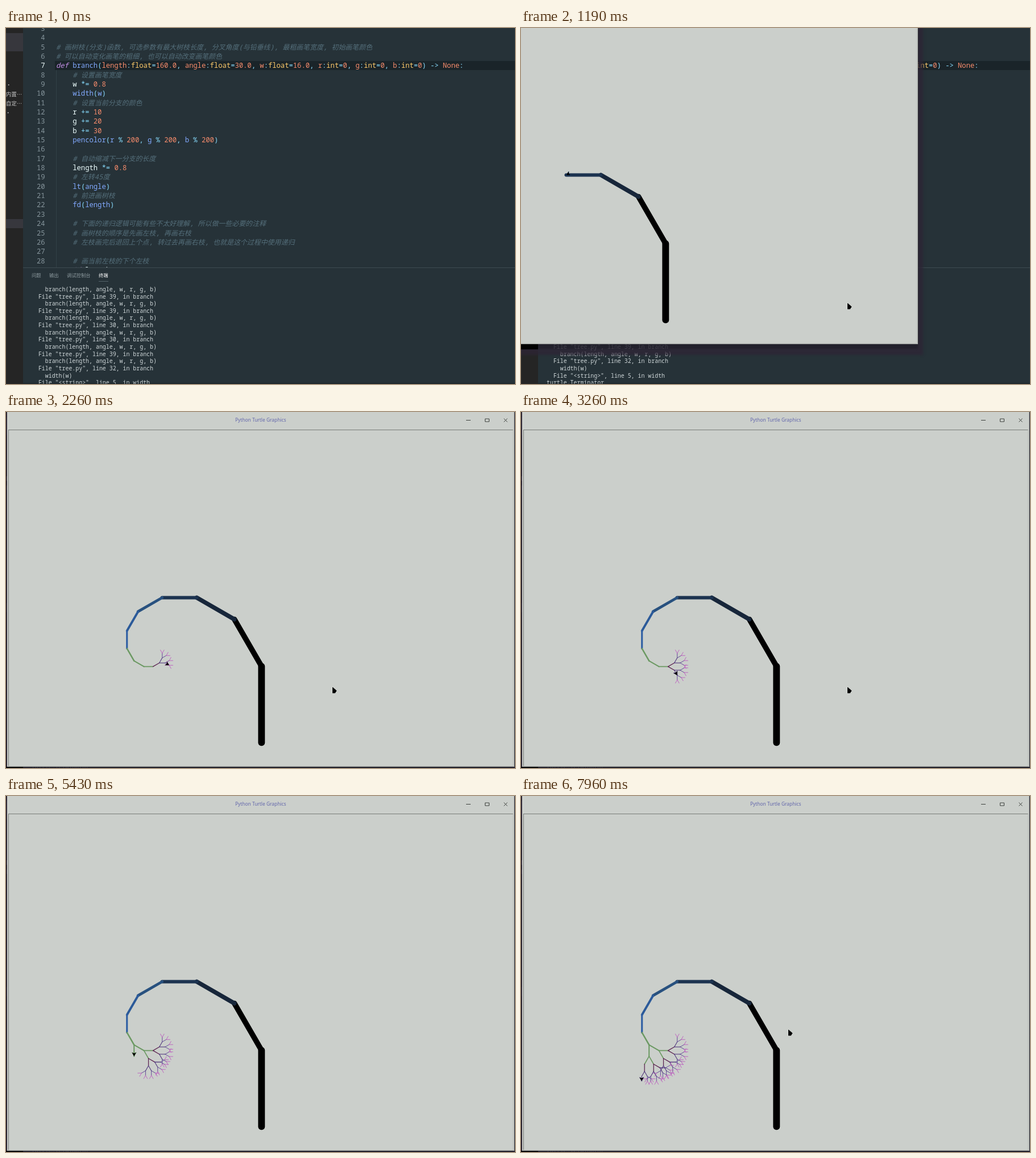
An HTML page with a canvas for the animation above (8 s loop, 895x626 px).

```html
<!DOCTYPE html>
<html lang="zh">
<head>
<meta charset="utf-8">
<title>Recursive tree</title>
<style>
html, body { margin: 0; width: 100%; height: 100%; overflow: hidden; background: #263238; }
#stage { position: absolute; left: 0; top: 0; width: 895px; height: 626px; overflow: hidden; background: #263238; }
#stage div, #stage canvas, #stage svg { position: absolute; }
.row { white-space: pre; }
.code, .num { font: 12.19px/16.35px "Noto Sans Mono", "Noto Sans CJK SC", monospace; }
.num { left: 30px; width: 38.5px; text-align: right; color: #85949b; }
.code { left: 88px; }
.cjk { font-family: "Noto Sans CJK SC", sans-serif; font-size: 11.95px; line-height: 0; }
.note { color: #546e7a; font-style: italic; }
.key { color: #c792ea; font-style: italic; }
.val { color: #f78c6c; }
.type { color: #ffcb6b; }
.fn { color: #82aaff; }
.op { color: #89ddff; }
.name { color: #eeffff; }
#editor { left: 0; top: 0; width: 895px; height: 421px; overflow: hidden; }
#side { left: 0; top: 0; width: 30px; height: 626px; overflow: hidden; background: #252525; color: #c4c4c4; font: 9.4px/16px "Noto Sans CJK SC", sans-serif; }
.sel { left: 0; width: 30px; background: #37373d; }
.tab { top: 427px; font: 8.3px/15px "Noto Sans CJK SC", sans-serif; color: #8d9a9f; }
.term { font: 9.92px/12.65px "Noto Sans Mono", monospace; color: #ced6d8; }
#win { box-sizing: border-box; overflow: hidden; background: #cbcfcb; border: 1px solid #9da19d; border-left-color: #d5d8d5; border-top-color: #d5d8d5; }
#shade { box-shadow: 0 8px 3px rgba(16,22,28,.35), 0 10px 4px 9px rgba(46,36,54,.75); }
#strip { left: 0; width: 30px; height: 9px; background: #000; }
#frame { left: 1px; right: 1px; top: 31px; bottom: 0; border: 1px solid #c0c4c0; border-top-color: #797d79; border-left-color: #797d79; }
#title { left: 0; right: 0; top: 5px; text-align: center; font: 8.4px/18px "Noto Sans", sans-serif; color: #6468ac; }
#btns { right: 9px; top: 9px; }
</style>
</head>
<body>
<div id="stage">
  <div id="editor"></div>
  <div style="left:30px;top:421px;width:865px;height:1px;background:#3d4a50"></div>
  <div id="term"></div>
  <div style="left:30px;top:624px;width:865px;height:2px;background:rgba(0,0,0,.2)"></div>
  <div id="side">
    <div class="sel" style="top:9px;height:32px"></div>
    <div class="sel" style="top:336px;height:16px"></div>
    <div class="row" style="left:0;top:91px">·</div>
    <div class="row" style="left:0;top:108px">内置⋯</div>
    <div class="row" style="left:0;top:124px">自定⋯</div>
    <div class="row" style="left:-1px;top:140px">·</div>
  </div>
  <div id="shade"></div>
  <div id="strip"></div>
  <div id="win">
    <div id="title">Python Turtle Graphics</div>
    <svg id="btns" width="80" height="12" fill="none" stroke="#3c403c">
      <path d="M5 5.5h8M38.5 3h7v5h-7zM71.5 2.5l6 6m0-6l-6 6"/>
    </svg>
    <div id="frame"></div>
    <canvas id="tree" width="895" height="626"></canvas>
  </div>
  <svg id="mouse" width="16" height="18" style="left:0;top:0">
    <path d="M.5 .5L9.2 8L5.8 13H.5Z" fill="#000" stroke="#d4d8d4"/>
  </svg>
</div>
<script>
const LOOP = 8000, PITCH = 16.35;
const $ = id => document.getElementById(id);

function add(parent, cls, text, css) {
  const el = document.createElement('div');
  el.className = cls;
  el.textContent = text;
  Object.assign(el.style, css);
  parent.append(el);
  return el;
}
function span(parent, cls, text) {
  const el = document.createElement('span');
  el.className = cls;
  el.textContent = text;
  parent.append(el);
  return el;
}

// ---- editor ----
const source = [
  '', '',
  '# 画树枝(分支)函数, 可选参数有最大树枝长度, 分叉角度(与铅垂线), 最粗画笔宽度, 初始画笔颜色',
  '# 可以自动变化画笔的粗细, 也可以自动改变画笔颜色',
  'def branch(length:float=160.0, angle:float=30.0, w:float=16.0, r:int=0, g:int=0, b:int=0) -> None:',
  '    # 设置画笔宽度',
  '    w *= 0.8',
  '    width(w)',
  '    # 设置当前分支的颜色',
  '    r += 10',
  '    g += 20',
  '    b += 30',
  '    pencolor(r % 200, g % 200, b % 200)',
  '',
  '    # 自动缩减下一分支的长度',
  '    length *= 0.8',
  '    # 左转45度',
  '    lt(angle)',
  '    # 前进画树枝',
  '    fd(length)',
  '',
  '    # 下面的递归逻辑可能有些不太好理解, 所以做一些必要的注释',
  '    # 画树枝的顺序是先画左枝, 再画右枝',
  '    # 左枝画完后退回上个点, 转过去再画右枝, 也就是这个过程中使用递归',
  '',
  '    # 画当前左枝的下个左枝',
  '    if length >= 10.0:'
];
const TOKEN = /(#.*)|\b(def|if)\b|(\d+(?:\.\d+)?|None)|\b(float|int)\b|([a-z]+(?=\())|([-+*%=<>:(),]+)|([a-z]+)|\s+/g;
const KINDS = ['note', 'key', 'val', 'type', 'fn', 'op', 'name'];

function paintLine(row, text) {
  const nameClass = text.startsWith('def') ? 'val' : text.includes('(') ? 'fn' : 'name';
  for (const m of text.matchAll(TOKEN)) {
    const kind = KINDS[m.slice(1).findIndex(g => g !== undefined)];
    if (kind === 'note') {
      const note = span(row, 'note', '');
      m[0].split(/([\u4e00-\u9fff]+)/).forEach((part, i) => span(note, i % 2 ? 'cjk' : '', part));
    } else span(row, kind === 'name' ? nameClass : kind || '', m[0]);
  }
}
const rowTop = n => 66.4 + (n - 7) * PITCH - PITCH / 2 + 'px';
const editor = $('editor');
add(editor, '', '', { left: '86px', top: '58px', width: '809px', height: '16px', background: '#1a2429' });
add(editor, '', '', { left: '87.5px', top: '74px', width: '1px', height: '347px', background: '#324047' });
source.forEach((text, i) => {
  const n = i + 3;
  add(editor, 'num', n, { top: rowTop(n), color: n === 7 ? '#eeffff' : '' });
  paintLine(add(editor, 'row code', '', { top: rowTop(n) }), text);
});

// ---- terminal ----
[['问题', 45], ['输出', 76], ['调试控制台', 107], ['终端', 163]].forEach(([text, x]) =>
  add($('stage'), 'row tab', text, { left: x + 'px', color: x === 163 ? '#fff' : '' }));
add($('stage'), '', '', { left: '163px', top: '445px', width: '17px', height: '1px', background: '#54636a' });
$('stage').append($('shade'), $('strip'), $('win'), $('mouse'));

const call = '    branch(length, angle, w, r, g, b)';
const log = [call];
for (const n of [39, 39, 30, 30, 39]) log.push(`  File "tree.py", line ${n}, in branch`, call);
log.push('  File "tree.py", line 32, in branch', '    width(w)', '  File "<string>", line 5, in width', 'turtle.Terminator');
const rows = log.map(text => add($('term'), 'row term', text, { left: '45px' }));
function scrollLog(by) {
  rows.forEach((row, i) => {
    row.style.top = 452.9 + (i - by) * 12.64 + 'px';
    row.style.visibility = i < by ? 'hidden' : '';
  });
}

// ---- turtle program, timed in screen updates ----
const SCALE = 0.745, LIMIT = 1200;
const INK = ['#000', '#000', '#17263a', '#1c3350', '#28517f', '#2b5a99', '#2f5fa4', '#6b9962', '#6b9962',
  '#6b9962', '#5b2350', '#4b2f78', '#5a3f90', '#bb5cbf'];
const ops = [];
let clock = 0, x = 449.3, y = 331, dir = 90;

function turn(deg, level) {
  const end = clock + 1 + Math.floor(Math.abs(deg) / 9);
  ops.push({ start: clock, end, x, y, nx: x, ny: y, dir, ndir: dir + deg, level });
  clock = end;
  dir += deg;
}
function move(len, level, pen = len > 0) {
  const end = clock + 1 + Math.floor(Math.abs(len) / 11.98);
  const a = dir * Math.PI / 180;
  const nx = x + len * SCALE * Math.cos(a), ny = y - len * SCALE * Math.sin(a);
  ops.push({ start: clock, end, x, y, nx, ny, dir, ndir: dir, level, pen });
  clock = end;
  x = nx;
  y = ny;
}
function branch(len, level) {
  if (clock > LIMIT) return;
  for (const side of [30, -60]) {
    turn(side, level);
    move(len, level);
    if (len > 10) branch(len * 0.8, level + 1);
    if (clock > LIMIT) return;
    move(-len, level);
  }
  turn(30, level);
}
move(-336, 0, false);
move(180, 0);
branch(128, 1);

// ---- drawing ----
const ctx = $('tree').getContext('2d');
ctx.lineCap = 'round';

function drawTree(step) {
  ctx.clearRect(0, 0, 895, 626);
  let pose = ops[0], k = 0;
  for (const op of ops) {
    if (op.start >= step && op !== ops[0]) break;
    pose = op;
    k = Math.min(1, Math.max(0, (step - op.start) / (op.end - op.start)));
    if (!op.pen) continue;
    ctx.strokeStyle = INK[op.level];
    ctx.lineWidth = Math.max(0.9, 16 * SCALE * 0.8 ** op.level);
    ctx.beginPath();
    ctx.moveTo(op.x, op.y);
    ctx.lineTo(op.x + (op.nx - op.x) * k, op.y + (op.ny - op.y) * k);
    ctx.stroke();
  }
  const mix = (a, b) => a + (b - a) * k;
  ctx.save();
  ctx.translate(mix(pose.x, pose.nx), mix(pose.y, pose.ny));
  ctx.rotate(-mix(pose.dir, pose.ndir) * Math.PI / 180);
  ctx.scale(SCALE, SCALE);
  ctx.beginPath();
  ctx.moveTo(0, 0);
  ctx.lineTo(-9, 5);
  ctx.lineTo(-7, 0);
  ctx.lineTo(-9, -5);
  ctx.closePath();
  ctx.fillStyle = '#000';
  ctx.strokeStyle = INK[pose.level];
  ctx.lineWidth = 0.8;
  ctx.stroke();
  ctx.fill();
  ctx.restore();
}

// ---- timeline ----
const TICKS = [910, 970, 1190, 1760, 2610, 3460, 4280, 5130, 5970, 6820, 7670, 7960];
const PACE = [[970, 0], [1190, 87.5], [2260, 263], [3260, 416], [5430, 755], [7960, 1154]];
const MOUSE = [[910, 573, 482], [4120, 573, 482], [4220, 482, 483], [4280, 400, 430], [4430, 0, 29],
  [4431, -60, 0], [6399, -60, 480], [6400, 81, 488], [6770, 412, 411], [6870, 469, 409]];
// time, left, top, right, bottom
const WINDOW = [[910, -191, -69, 502, 441], [1070, -192, -69, 698, 556], [1240, 1.5, -1, 894, 624]];

function sample(table, t) {
  const i = table.findIndex(row => row[0] > t);
  if (i === 0) return table[0].slice(1);
  if (i < 0) return table[table.length - 1].slice(1);
  const a = table[i - 1], b = table[i], k = (t - a[0]) / (b[0] - a[0]);
  return a.slice(1).map((v, j) => v + (b[j + 1] - v) * k);
}
function hold(t) {
  const start = TICKS.filter(s => s <= t).pop();
  return start === undefined ? t : start + Math.floor((t - start) / 50) * 50;
}

function render(now) {
  const t = hold(now % LOOP);
  scrollLog(t < 710 ? 0 : 1);
  const open = t >= 910;
  for (const id of ['shade', 'strip', 'win', 'mouse']) $(id).style.display = open ? '' : 'none';
  if (!open) return;

  const [, l, top, r, b] = WINDOW.filter(w => w[0] <= t).pop();
  for (const id of ['shade', 'win']) Object.assign($(id).style, {
    left: l + 'px', top: top + 'px', width: r - l + 'px', height: b - top + 'px',
    opacity: t < 970 ? 0.6 : 1
  });
  $('strip').style.top = b + 'px';
  // keep the canvas centred in the window
  const dx = (l + r) / 2 - 447.75, dy = (top + b) / 2 - 311.5;
  $('tree').style.left = dx - l - 1 + 'px';
  $('tree').style.top = dy - top - 1 + 'px';
  drawTree(sample(PACE, t)[0]);

  const [mx, my] = sample(MOUSE, t);
  $('mouse').style.transform = `translate(${mx}px, ${my}px)`;
}

const begin = performance.now();
function loop() {
  render(performance.now() - begin);
  requestAnimationFrame(loop);
}
loop();
</script>
</body>
</html>
```
